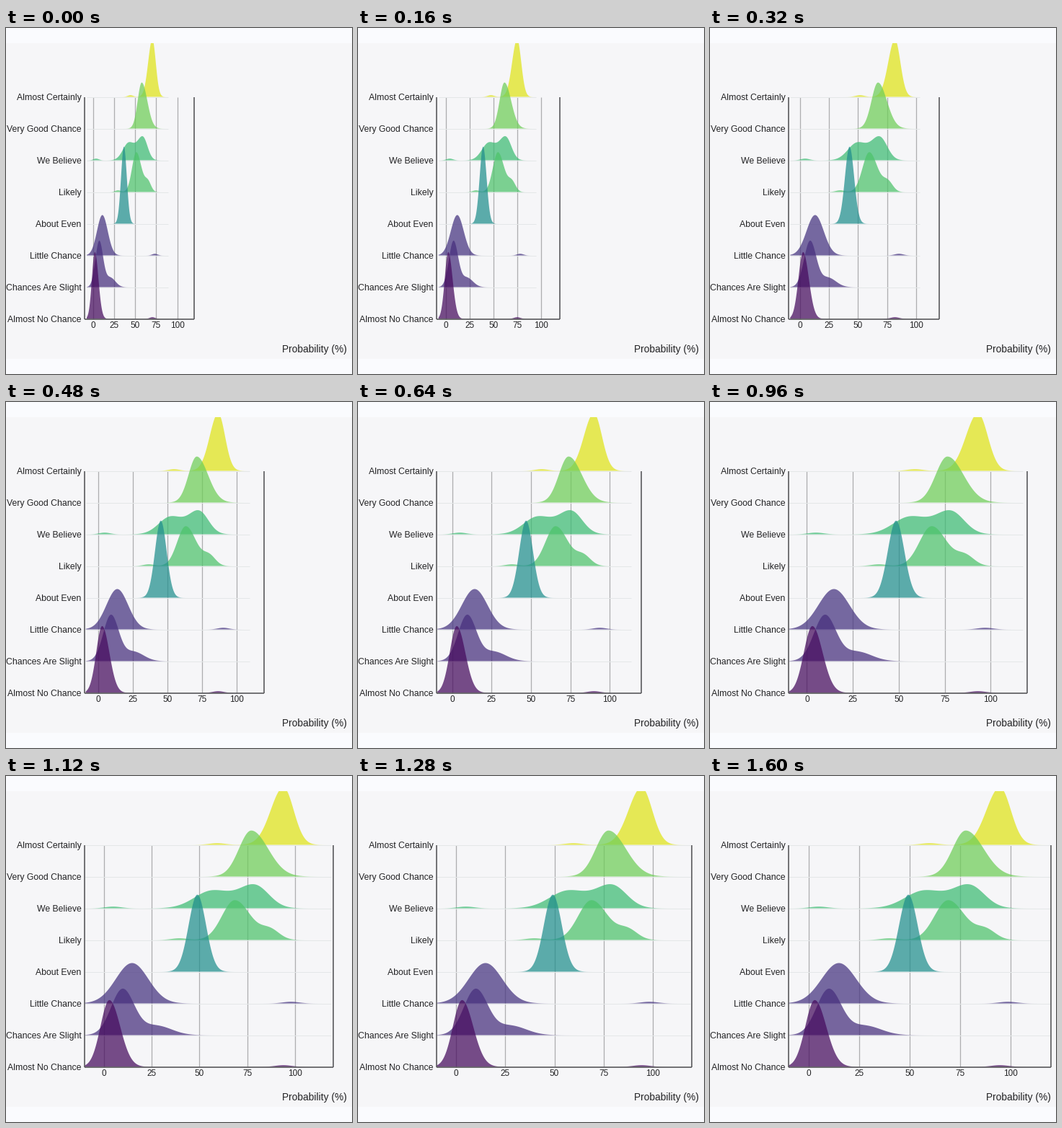
Recreate the animation shown at these times as a matplotlib script. Size 480 px wide and 480 px high, loop 1680 ms.

```python
import numpy as np
import matplotlib.pyplot as plt
from matplotlib.animation import FuncAnimation
from matplotlib.patches import Rectangle

SIZE, DPI = 480, 100
FRAMES, INTERVAL = 21, 80
LEFT, TOP, STEP = 109, 95.5, 44
BOTTOM = TOP + 7 * STEP
LOW, HIGH = -10, 120
AREA = 983  # every ridge encloses the same area
INK = "#222224"

# label, bells as (share, mode, left spread, right spread) in percent
ROWS = [
    ("Almost Certainly", [(1, 95, 6.7, 5.4)]),
    ("Very Good Chance", [(1, 78, 6.5, 8.9)]),
    ("We Believe", [(0.49, 80, 8, 7.4), (0.51, 57.5, 9.5, 10.5)]),
    ("Likely", [(0.86, 69.3, 6.8, 8.2), (0.14, 88, 5, 5)]),
    ("About Even", [(1, 49.5, 4.6, 4.6)]),
    ("Little Chance", [(1, 15, 8.6, 8.6)]),
    ("Chances Are Slight", [(0.8, 10, 6.1, 6.2), (0.2, 28, 7.2, 8)]),
    ("Almost No Chance", [(1, 3, 4.7, 5.7)]),
]
# modes of the few odd answers far from the rest
STRAY = {"Almost Certainly": 60, "We Believe": 5, "Likely": 40,
         "Little Chance": 99, "Almost No Chance": 95}


def bell(v, share, mode, left, right):
    """Two-sided Gaussian whose height follows from its area."""
    spread = np.where(v < mode, left, right)
    return share * AREA / (left + right) * np.exp(-0.5 * ((v - mode) / spread)**2)


def spring(t, damping=0.9, speed=0.242):
    """Damped spring moving from 0 towards 1."""
    root = np.sqrt(1 - damping**2)
    swing = root * speed * t
    wave = np.cos(swing) + damping / root * np.sin(swing)
    return 1 - np.exp(-damping * speed * t) * wave


def px(size):
    return size * 72 / DPI


plt.rcParams["font.family"] = "Liberation Sans"
fig = plt.figure(figsize=(SIZE / DPI, SIZE / DPI), dpi=DPI, facecolor="#fafbfe")
ax = fig.add_axes([0, 0, 1, 1])
ax.set_xlim(0, SIZE)
ax.set_ylim(SIZE, 0)
ax.axis("off")
ax.add_patch(Rectangle((0, 21), SIZE, 438, fc="#f6f6f8", lw=0, zorder=0))


def write(x, y, text, size, align="right"):
    return ax.text(x, y, text, fontsize=px(size), color=INK, ha=align, va="baseline")


def stroke(color, width, z):
    return ax.plot([], [], color=color, lw=px(width), zorder=z,
                   solid_capstyle="butt")[0]


marks = range(0, 101, 25)
grid = [stroke("#aeaeb0", 1.3, 1) for _ in marks]
ticks = [write(0, 415.8, str(v), 11.7, "center") for v in marks]
left, right, floor = [stroke("#555558", 1.6, 12) for _ in range(3)]

values = np.linspace(LOW, HIGH, 500)
ridges = []
for k, (label, bells) in enumerate(ROWS):
    base = TOP + k * STEP
    height = sum(bell(values, *b) for b in bells)
    if label in STRAY:
        height = 0.98 * height + bell(values, 0.02, STRAY[label], 4.3, 4.3)
    mean = sum(b[0] * b[1] for b in bells)
    line = stroke("#e4e7e8", 1, 1.5)
    fill, = ax.fill([0, 0], [0, 0], fc=plt.cm.viridis(mean / 100),
                    alpha=0.73, lw=0, zorder=2 + k)
    fill.set_clip_path(Rectangle((LEFT - 1, 21), SIZE, 438, transform=ax.transData))
    ridges.append((line, fill, base, base - height))
    write(104.6, base + 4.4, label, 12.2)

write(473, 450, "Probability (%)", 13.7)


def update(i):
    p = spring(i)
    width = 152 + 215 * p
    scale = width / (HIGH - LOW)
    zero = LEFT - LOW * scale
    end = LEFT + width

    for v, line, tick in zip(marks, grid, ticks):
        x = zero + v * scale
        line.set_data([x, x], [TOP, BOTTOM])
        tick.set_x(x)

    # ridges start narrower than the axis and catch up with it
    xs = zero + values * (0.867 + 1.957 * p)
    for line, fill, base, ys in ridges:
        line.set_data([xs[0], xs[-1]], [base, base])
        fill.set_xy(np.column_stack([np.r_[xs, xs[-1], xs[0]],
                                     np.r_[ys, base, base]]))

    left.set_data([LEFT, LEFT], [TOP, BOTTOM + 0.8])
    right.set_data([end, end], [TOP, BOTTOM + 0.8])
    floor.set_data([LEFT, end], [BOTTOM, BOTTOM])
    return []


anim = FuncAnimation(fig, update, frames=FRAMES, interval=INTERVAL,
                     init_func=lambda: update(0), repeat=True, repeat_delay=0)
plt.show()
```
